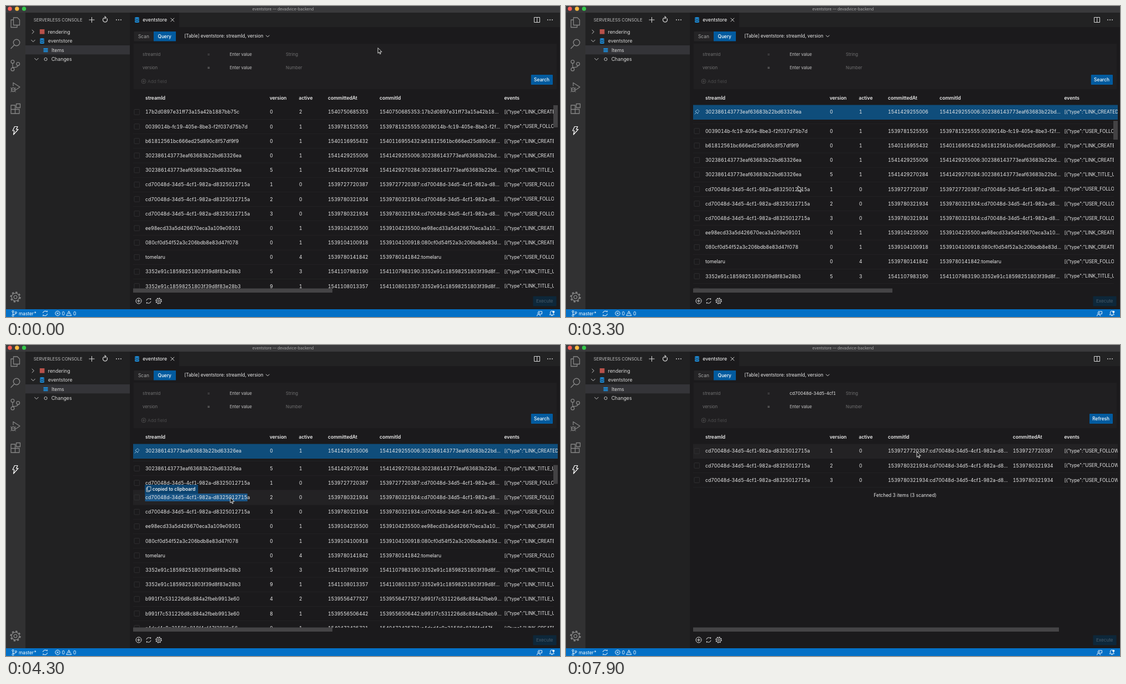
Write an HTML page that moves like this. It is 998 px wide and 561 px high and loops after 8 s.

```html
<!DOCTYPE html>
<html lang="en">
<head>
<meta charset="utf-8">
<title>eventstore</title>
<style>
html, body { margin: 0; width: 100%; height: 100%; overflow: hidden; background: #1b1a1c; }
svg { display: block; width: 998px; height: 561px; }
text { font-family: Inter, Roboto, "Liberation Sans", sans-serif; font-variant-numeric: tabular-nums; white-space: pre; }
.mark { font-variant-numeric: normal; }
</style>
</head>
<body>
<svg id="stage" viewBox="0 0 998 561" xmlns="http://www.w3.org/2000/svg"></svg>
<script>
const LOOP = 8000, STEP = 100, PITCH = 26.18, TOP = 191.3;
const BRIGHT = '#ececec', LIGHT = '#d9d9d9', DIM = '#6f6f70', BLUE = '#025b9f', EDITOR = '#1b1a1c';

// ---- markup helpers; text is placed by the middle of its capitals
// Tabular figures would also widen hyphens, colons and dots, so those stay proportional.
const proportional = s => s.replace(/[-:.]+/g, '<tspan class="mark">$&</tspan>');
const text = (x, y, s, size = 8.65, fill = LIGHT, weight = 400, more = '') =>
  `<text x="${x}" y="${(y + size * 0.363).toFixed(2)}" font-size="${size}" fill="${fill}" font-weight="${weight}" ${more}>${proportional(s)}</text>`;
const rect = (x, y, w, h, fill, more = '') =>
  `<rect x="${x}" y="${y}" width="${w}" height="${h}" fill="${fill}" ${more}/>`;
const path = (d, stroke = LIGHT, w = 1, fill = 'none') =>
  `<path d="${d}" stroke="${stroke}" stroke-width="${w}" fill="${fill}" stroke-linejoin="round" stroke-linecap="round"/>`;
const ring = (x, y, r, stroke = LIGHT, w = 1, more = '') =>
  `<circle cx="${x}" cy="${y}" r="${r}" fill="none" stroke="${stroke}" stroke-width="${w}" ${more}/>`;
const dot = (x, y, r, fill) => `<circle cx="${x}" cy="${y}" r="${r}" fill="${fill}"/>`;
const group = (id, body, more = '') => `<g id="${id}" ${more}>${body}</g>`;

// ---- icons
const dots = (x, y) => [-4, 0, 4].map(d => dot(x + d, y, 0.9, LIGHT)).join('');
const plus = (x, y, r, c = LIGHT) => path(`M${x - r} ${y}h${2 * r}M${x} ${y - r}v${2 * r}`, c);
const reload = (x, y, c = LIGHT) =>
  path(`M${x - 4} ${y - 1}a4.2 4.2 0 0 1 7.6 -1.4v-2.2M${x + 4} ${y + 1}a4.2 4.2 0 0 1 -7.6 1.4v2.2`, c);
const gear = (x, y, r, c, w) => ring(x, y, r * 0.3, c, w) + ring(x, y, r * 0.72, c, w) +
  ring(x, y, r * 0.9, c, r * 0.24, `stroke-dasharray="${r * 0.35} ${r * 0.357}"`);
const database = (x, y) =>
  path(`M${x - 4} ${y - 3.4}a4 1.7 0 0 1 8 0v6.8a4 1.7 0 0 1 -8 0z`, 'none', 0, '#1c8ad6') +
  [-1.8, 1.4].map(d => path(`M${x - 4} ${y + d}q4 2.6 8 0`, '#1e2022', 0.9)).join('');
const pin = (x, y, c) => path(`M${x - 4} ${y + 4}l2.6 -2.6M${x - 2.8} ${y - 0.8}l4 4l0.8 -2.6l2 -2l-3 -3l-2 2z`, c, 0.9);
const pages = (x, y, c) => path(`M${x - 2} ${y - 4.5}h6v7h-6zM${x - 2} ${y - 2.5}h-2v7h5.5v-2`, c, 0.9);
const branch = (x, y, s, c, w) => ring(x - 3.5 * s, y - 5 * s, 2.2 * s, c, w) + ring(x - 3.5 * s, y + 5.5 * s, 2.2 * s, c, w) +
  ring(x + 4 * s, y - 2 * s, 2.2 * s, c, w) +
  path(`M${x - 3.5 * s} ${y - 2.8 * s}v${6 * s}M${x + 4 * s} ${y + 0.3 * s}q${-0.5 * s} ${2.6 * s} ${-7 * s} ${2.6 * s}`, c, w);

// ---- table data: id, shown id length, version, active, time, event
const CD = 'cd70048d-34d5-4cf1-982a-d8325012715a';
const EVENTS = { L: 'LINK_CREATED', U: 'USER_FOLLOWED', T: 'LINK_TITLE_UPDATED' };
const ROWS = `17b2d0897e31ff73a15a42b1887bb75c 25 0 2 1540750685353 L
0039014b-fc19-405e-8be3-f2f037d75b7d 27 0 1 1539781525555 U
b61812561bc666ed25d890c8f57df9f9 25 0 1 1540116955432 L
302386143773eaf63683b22bd63326ea 25 0 1 1541429255006 L
302386143773eaf63683b22bd63326ea 25 5 1 1541429270284 T
${CD} 26 1 0 1539727720387 U
${CD} 26 2 0 1539780321934 U
${CD} 26 3 0 1539780321934 U
ee98ecd33a5d426670eca3a109e09101 25 0 1 1539104235500 L
080cf0d54f52a3c206bdb8e83d47f078 26 0 1 1539104100918 L
tomelaru 8 0 4 1539780141842 U
3352e91c18598251803f39d8f83e28b3 25 5 3 1541107983190 T
3352e91c18598251803f39d8f83e28b3 25 9 1 1541108013357 T
b991f7c531226d8c884a2fbeb9913e60 26 4 2 1539556477527 T
b991f7c531226d8c884a2fbeb9913e60 26 8 1 1539556506442 T
a4dad4a9e31586e818f4cf47f3888e56 25 0 1 1540472425721 L`.split('\n').map(r => r.split(' '));

function cells([id, n, version, active, time, ev], y, timeX = 580, commitX = 673) {
  const commit = time + ':' + id.slice(0, n) + (id.length > n ? '...' : '');
  const cell = (x, s, size) => text(x, y, s, size, BRIGHT);
  return cell(251, id) + cell(475.3, version) + cell(528, active) + cell(timeX, time) +
    cell(commitX, commit) + cell(897.5, `[{"type":"${EVENTS[ev]}"`, 8.3);
}
const box = y => rect(231, y - 4.8, 9.6, 9.6, 'none', 'rx="1" stroke="#333234" stroke-width="0.9"');
const row = (r, y, timeX, commitX) =>
  rect(229, y + 12.8, 765, 0.7, '#262527') + box(y) + cells(r, y, timeX, commitX);
const head = (x, s) => text(x, 166, s, 8.5, BRIGHT, 600);

// ---- fixed window parts
function chrome() {
  const A = '#868686';
  return rect(0, 0, 998, 561, EDITOR) + rect(0, 0, 998, 12, '#39393b') +
    dot(7, 5, 3.7, '#fc5b57') + dot(19.8, 5, 3.7, '#fdbc40') + dot(32.5, 5, 3.7, '#34c84a') +
    text(499, 5, 'eventstore — devadvice-backend', 6.95, '#a9a9aa', 400, 'text-anchor="middle"') +
    rect(0, 12, 35, 535, '#313132') + rect(35, 12, 188, 535, '#212122') + rect(223, 12, 775, 26, '#222223') +
    rect(223, 12, 89, 26, EDITOR) +
    // activity bar
    path('M13.5 21h7l4 4v9.5h-11zM13.5 25H9v13.5h11v-4', A, 1.3) +
    ring(19, 66, 5.7, A, 1.4) + path('M15 70.3L9 76.5', A, 1.4) +
    branch(16.5, 107, 1.3, A, 1.3) +
    path('M13 144v-5.5l12 7.8-8 5.4', A, 1.3) + ring(13, 151, 3.4, A, 1.2) +
    path('M9.6 151h6.8M8.5 147.5l2 1.5M17.5 147.5l-2 1.5M8.5 155l2-1.5M17.5 155l-2-1.5', A, 1) +
    path('M9 179h7.5v15H9zM9 186.5h15v7.5H9M18.5 176.5h7v7h-7z', A, 1.3) +
    path('M15.5 217.500h5.500l-2.500 5h3.500l-8.500 9.500 1.500-7h-3z', '#fff', 1.2) + gear(17, 525, 9.5, A, 1.3) +
    // side bar
    text(49.8, 25, 'SERVERLESS CONSOLE', 7.74, '#c0c0c0') + plus(154.5, 25, 4.6) +
    path('M181.8 22.7a4 4 0 1 1-3.3-1.7M178 18.7l2.4 2.2-2.4 2', LIGHT, 1.2) + dots(203, 25) +
    rect(35, 71, 188, 16.4, '#343438') +
    path('M47 43.3l3.4 3.2-3.4 3.2M45.6 61.3l3.3 3.4 3.3-3.4M51.6 94.3l3.3 3.4 3.3-3.4', '#c5c5c5') +
    rect(60.8, 42, 8.6, 8.6, '#b9524b') + text(75.5, 46.5, 'rendering', 8.8) +
    database(65, 63) + text(75.7, 63, 'eventstore', 8.8) +
    [76, 78.6, 81.2].map(y => rect(67.5, y, 8, 2, '#1c8ad6')).join('') + text(82, 79.5, 'Items', 8.8) +
    ring(71.5, 96, 2.6, '#c5c5c5') + text(81.7, 96, 'Changes', 8.8) +
    // tab and toolbar
    database(236, 25) + text(246.3, 25.3, 'eventstore', 8.8, '#fff') +
    path('M296.8 22l6 6M302.8 22l-6 6') + path('M952 20.5h9.500v9h-9.500zM956.700 20.500v9') + dots(980, 25) +
    rect(230.5, 46, 36, 17.5, '#252426') + rect(266, 46, 40, 17.5, BLUE) +
    text(238, 54.5, 'Scan', 8.4, '#a8a8a8') + text(273.5, 54.5, 'Query', 8.3, '#fff', 500) +
    text(321, 54.5, '[Table] eventstore: streamId, version', 8.25, BRIGHT) + path('M468.5 53l2.9 2.9 2.9-2.9') +
    // query form
    rect(230, 68, 762, 82, '#201f21') +
    text(246, 87, 'streamId', 7.85, DIM) + text(246, 111.5, 'version', 7.85, DIM) +
    text(362.5, 87, '=', 7.85, DIM) + text(362.5, 111.5, '=', 7.85, '#b0b0b0') +
    text(403, 111, 'Enter value', 7.6, '#c4c4c4') + text(504, 87, 'String', 7.85, DIM) + text(504, 111.5, 'Number', 7.85, DIM) +
    ring(248, 135.8, 4, '#4a4a4b') + plus(248, 135.8, 2, '#4a4a4b') + text(255, 136, 'Add field', 8.2, '#4a4a4b') +
    // footer
    ring(239, 532, 5) + plus(239, 532, 2.7) + reload(257, 532) + gear(275, 532, 5.6, LIGHT, 0.9) +
    rect(949.5, 523.5, 42, 18, '#0d273a', 'rx="1"') + text(955, 532.5, 'Execute', 8.1, '#4a5d6c') +
    rect(0, 547, 998, 14, '#0470c6') +
    branch(15, 554.5, 0.7, '#fff', 0.9) + text(23, 554.8, 'master*', 8.3, '#fff') + reload(70.5, 554.5, '#fff') +
    ring(93, 554.5, 4.2, '#fff', 0.9) + path('M91.5 553l3 3M94.5 553l-3 3', '#fff', 0.9) + text(100.5, 554.8, '0', 8.5, '#fff') +
    path('M113.5 550.5l4.3 8h-8.6zM113.5 553.5v2.5', '#fff', 0.9) + text(121, 554.8, '0', 8.5, '#fff') +
    path('M959 551h6.5v4.5h-2.5l-1.5 2M956.5 559a3 3 0 0 1 6 0', '#fff', 0.9) + ring(959.5, 554, 1.5, '#fff', 0.9) +
    path('M979.5 557h8l-1-1.5v-2.5a3 3 0 0 0-6 0v2.5zM982.5 558.5h2', '#fff', 0.9) + dot(986.3, 551.8, 2, '#fff');
}

function menu() {
  const ink = '#3c3c3c', soft = '#8c8c8c';
  const items = [['Edit', 285.5], ['Duplicate Row', 309], ['Delete Item', 332.5], ['Copy Column', 364], ['Copy Row', 387.5], ['Pin Row', 418]];
  return rect(361, 274, 150, 158, '#000', 'opacity="0.35"') + rect(361, 273, 150, 157.5, '#fdfdfd') +
    rect(361, 347.8, 150, 0.9, '#d4d4d4') + rect(361, 402.3, 150, 0.9, '#d4d4d4') +
    items.map(([s, y]) => text(388.7, y, s, 7.7, ink)).join('') +
    text(408, 285.8, 'double click', 6.6, soft) + text(443.5, 364.3, 'Cmd + Click', 6.6, soft) +
    path('M371 286.5l5.3-5.8 2 2-5.5 5.6-2.3 0.5zM370 289.5h9', ink, 0.9) +
    path('M370.5 303.5h5l2.5 2.5v7h-7.5zM374.2 306.5v4M372.2 308.5h4', ink, 0.9) +
    path('M370 329h8M372.5 329v-1.3h3V329M371 329v7.5h6V329', ink, 0.9) +
    pages(374, 363.5, ink) + pages(374, 387, ink) + pin(374, 417.5, ink);
}

const input = (id, x, anchor) =>
  group(id, text(x, 87, CD, 7.75, BRIGHT, 400, `text-anchor="${anchor}"`), 'clip-path="url(#fieldClip)"');
const button = (id, x, label) => group(id, rect(x, 124, 985 - x, 18, BLUE, 'rx="1"') + text(x + 5.3, 133.3, label, 8.3, '#fff', 500));
const clip = (id, shape) => `<clipPath id="${id}">${shape}</clipPath>`;

const rowY = i => TOP + i * PITCH;
const copyY = rowY(6);
document.getElementById('stage').innerHTML =
  clip('bodyClip', rect(229, 179, 758, 331, '#fff', 'id="body"')) +
  clip('wideClip', rect(229, 150, 765, 370, '#fff')) +
  clip('fieldClip', rect(402.5, 76, 83, 20, '#fff')) +
  chrome() + head(251, 'streamId') + head(475, 'version') + head(527.5, 'active') + head(897.5, 'events') +
  group('list',
    head(580, 'committedAt') + head(673, 'commitId') +
    group('clipped', group('rows',
      rect(229, -13, 758, 26, '#232224', 'id="hover"') +
      rect(250.5, copyY - 7, 184.5, 14, '#1b5687', 'id="mark"') +
      ROWS.map((r, i) => row(r, rowY(i))).join('') +
      group('tip', rect(250, copyY - 23, 96, 16.5, '#0c436f') + pages(257, copyY - 14.8, LIGHT) +
        text(263.7, copyY - 14.8, 'copied to clipboard', 8.3, BRIGHT, 600)) +
      group('picked', rect(229, rowY(3) - 13, 758, 26, '#033c5e') + cells(ROWS[3], rowY(3)) +
        path(`M232.5 ${rowY(3)}l2 2.2l4.2 -4.6`, '#fff', 1.2))
    ), 'clip-path="url(#bodyClip)"') +
    rect(986, 179, 8, 40, '#434244', 'id="thumb"') +
    group('pinned', rect(229, 178.5, 765, 26.5, '#0f4d7b') + pin(236, 191, '#9cc3e0') + cells(ROWS[3], TOP), 'clip-path="url(#wideClip)"') +
    rect(229, 509.5, 359, 7.5, '#454446')) +
  group('found',
    head(580, 'commitId') + head(805, 'committedAt') + rect(229, 178.5, 765, 26, '#232224', 'id="first"') +
    ROWS.slice(5, 8).map((r, i) => row(r, rowY(i), 805, 580)).join('') +
    text(611, 270.8, 'Fetched 3 items (3 scanned)', 8.35, BRIGHT, 400, 'text-anchor="middle"') +
    rect(229, 509.5, 659, 7.5, '#454446'), 'clip-path="url(#wideClip)"') +
  group('empty', text(403, 87, 'Enter value', 7.6, '#c4c4c4')) +
  rect(394, 74.5, 99, 24, '#1a1a1b', 'id="focus" rx="2" stroke="#0c6fb8" stroke-width="1.2"') +
  input('tail', 483.5, 'end') + input('value', 403, 'start') + rect(403, 82, 0.8, 10, LIGHT, 'id="caret"') +
  button('search', 945.8, 'Search') + button('refresh', 943, 'Refresh') +
  group('menu', menu()) +
  group('mouse', path('M0 0V9.3l2.2-2 1.5 3.4 1.5-.6-1.5-3.3h3z', '#f2f2f2', 0.9, '#111'));

// ---- timing
const PIN = 2700, FOCUS = 5300, PASTE = 5900, SEARCH = 6900;
const MOUSE = [[0, 670, 76], [1200, 361, 272], [1700, 361, 272], [2400, 392, 416], [2700, 392, 416], [3100, 418, 325],
  [3800, 418, 325], [4100, 404, 275.5], [4500, 404, 275.5], [5200, 436, 86], [6200, 436, 86], [6700, 963, 132], [6900, 963, 132], [7800, 632, 193]];
const SCROLL = [[3100, 0], [3300, 18], [3500, 62], [3700, 94], [3900, 99.6]];
const smooth = p => p * p * (3 - 2 * p);

function along(keys, t, ease = p => p) {
  const i = keys.findIndex(k => k[0] > t);
  if (i < 0) return keys[keys.length - 1].slice(1);
  if (!i) return keys[0].slice(1);
  const a = keys[i - 1], b = keys[i], p = ease((t - a[0]) / (b[0] - a[0]));
  return a.slice(1).map((v, k) => v + (b[k + 1] - v) * p);
}
const el = id => document.getElementById(id);
const show = (id, on) => el(id).style.display = on ? '' : 'none';
const set = (id, attrs) => { for (const k in attrs) el(id).setAttribute(k, attrs[k]); };

function draw(t) {
  const [x, y] = along(MOUSE, t, smooth), [scroll] = along(SCROLL, t);
  const pinned = t >= PIN, found = t >= SEARCH, open = t >= 1300 && !pinned;
  const shift = (pinned ? PITCH : 0) - scroll, top = pinned ? 205 : 179;
  show('list', !found);
  show('found', found);
  show('pinned', pinned);
  show('picked', open);
  show('menu', open);
  set('rows', { transform: `translate(0 ${shift})` });
  set('body', { y: top, height: 510 - top });
  set('thumb', { y: top + scroll * 0.116, height: pinned ? 34 : 40 });

  const at = Math.round((y + 3 - shift - TOP) / PITCH);
  const hovering = y > top && y < 510 && !open && !(t >= PIN && t < 3900);
  show('hover', hovering);
  set('hover', { y: rowY(at) - 13 });
  show('first', found && y > 176 && y < 204);

  const copied = t >= 4200 && t < 5200;
  show('mark', copied);
  show('tip', copied);

  const focused = t >= FOCUS && t < 6800;
  show('focus', focused);
  show('empty', t < PASTE && !focused);
  show('caret', focused && t < PASTE && t % 1000 < 500);
  show('tail', focused && t >= PASTE);
  show('value', t >= 6800);
  show('search', !found);
  show('refresh', found);
  show('mouse', t < PASTE || t >= 6200);
  set('mouse', { transform: `translate(${x} ${y})` });
}

const start = performance.now();
function tick() {
  const t = (performance.now() - start) % LOOP;
  draw(Math.floor(t / STEP) * STEP);
  requestAnimationFrame(tick);
}
draw(0);
requestAnimationFrame(tick);
</script>
</body>
</html>
```
